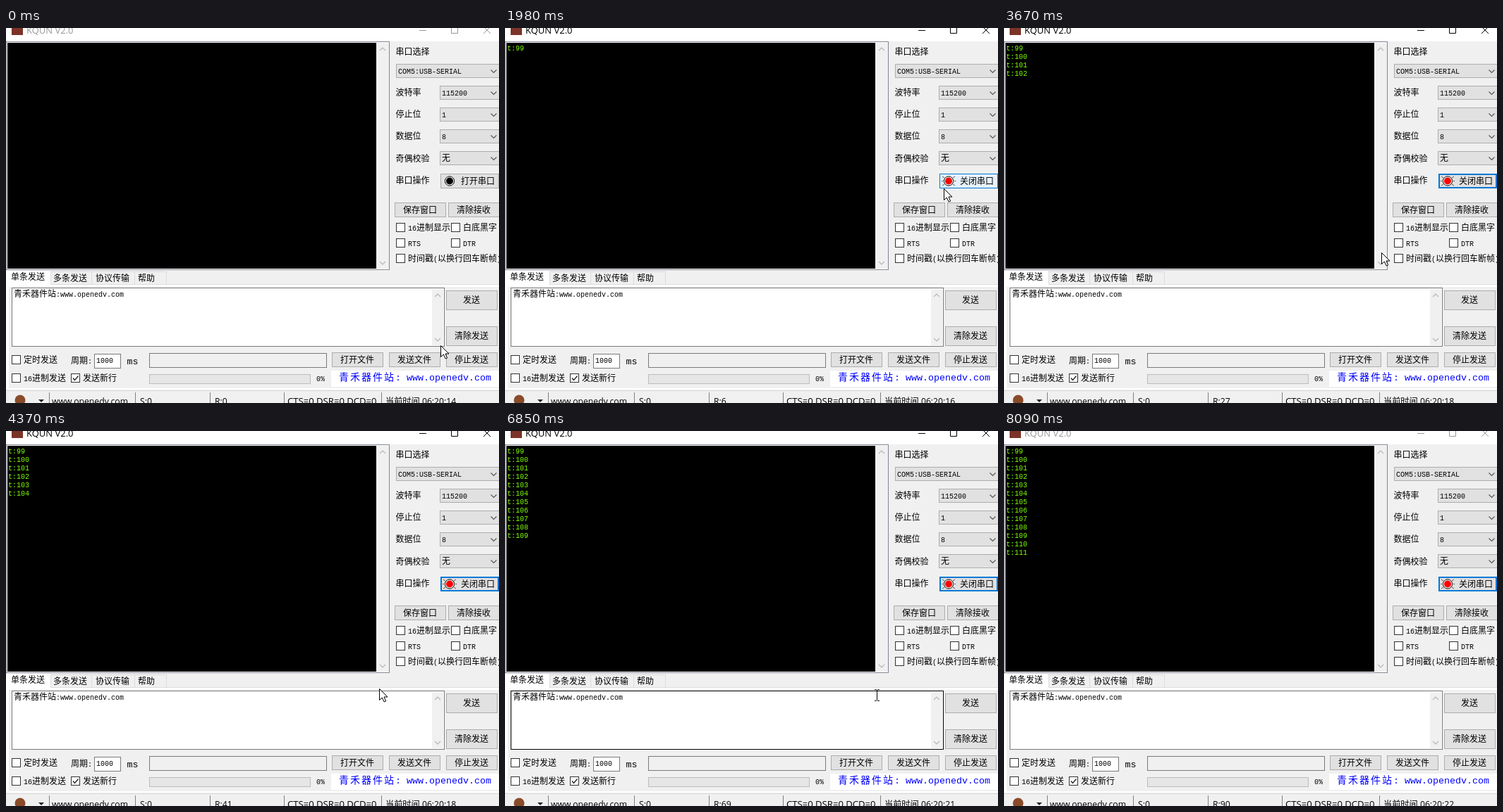
An HTML page for the animation above (8.16 s loop, 699 by 533 pixels).

```html
<!DOCTYPE html>
<html lang="zh">
<head>
<meta charset="utf-8">
<style>
  html, body { margin: 0; width: 100%; height: 100%; overflow: hidden; background: #f0f0f0; }
  svg { display: block; width: 699px; height: 533px; }
  text { white-space: pre; }
  .cjk { font-family: "Noto Sans CJK SC", "Noto Sans CJK", sans-serif; }
  .mono { font-family: "Liberation Mono", monospace; }
  .ui { font-family: "Open Sans", "Noto Sans CJK SC", "Noto Sans CJK", sans-serif; }
</style>
</head>
<body>
<svg id="stage" viewBox="0 0 699 533"></svg>
<script>
const LOOP = 8160;
const STEP = LOOP / 106; // the screen refreshes in even steps
const stage = document.getElementById('stage');
const BLUE = '#0078d7', GRAY = '#adadad', PALE = '#b5b5b5';

function set(el, attrs) {
  for (const key in attrs) el.setAttribute(key, attrs[key]);
}
function add(tag, attrs, parent = stage) {
  const el = document.createElementNS('http://www.w3.org/2000/svg', tag);
  set(el, attrs);
  return parent.appendChild(el);
}
const fillRect = (x, y, width, height, fill) => add('rect', { x, y, width, height, fill });
const box = (x, y, w, h, fill, stroke) =>
  add('rect', { x: x + .5, y: y + .5, width: w - 1, height: h - 1, fill, stroke });
const line = (d, stroke, width = 1) => add('path', { d, stroke, 'stroke-width': width, fill: 'none' });
const circle = (cx, cy, r, fill, stroke = 'none') => add('circle', { cx, cy, r, fill, stroke });
const chevron = (x, y, dir, color) => line(`M${x - 4} ${y - 2 * dir}l4 ${4 * dir} 4 ${-4 * dir}`, color, 1.1);

// Mixed text: full-width characters at the given size, Latin at half that advance.
function label(str, x, y, size = 12, fill = '#000') {
  const el = add('text', { x, y, fill });
  for (const run of str.match(/[\x00-\x7f]+|[^\x00-\x7f]+/g)) {
    const latin = run.charCodeAt(0) < 128;
    add('tspan', { class: latin ? 'mono' : 'cjk', 'font-size': latin ? size / 1.2 : size }, el).textContent = run;
  }
  return el;
}
function uiText(str, x, y, size = 12.2) {
  const el = add('text', { x, y, class: 'ui', 'font-size': size });
  el.textContent = str;
  return el;
}

const buttons = [];
function button(str, x, y, w, h) {
  const b = { x, y, w, h, shape: box(x, y, w, h, '#e1e1e1', GRAY) };
  label(str, x + w / 2 - 6 * str.length - .5, y + h / 2 + 4);
  buttons.push(b);
  return b;
}
function combo(str, x, y) {
  box(x, y, 700 - x, 20, '#e1e1e1', GRAY);
  label(str, x + 3, y + 14);
  chevron(691.5, y + 10.5, 1, '#555');
}
function check(str, x, y, checked) {
  box(x, y, 13, 13, '#fff', '#333');
  if (checked) line(`M${x + 3} ${y + 6.5}l2.5 3 5 -6`, '#222', 1.3);
  label(str, x + 17, y + 10.5);
}
function scrollbar(x, y, w, h) {
  fillRect(x, y, w, h, '#f0f0f0');
  chevron(x + w / 2, y + 9, -1, PALE);
  chevron(x + w / 2, y + h - 8, 1, PALE);
}

// Title bar
fillRect(0, 0, 699, 19, '#fff');
fillRect(8, -6, 16, 16, '#7b3427');
const title = uiText('KQUN V2.0', 29, 8, 13);
const controls = line('M586 3.5h10M631.5 -2v9.500h9v-9.500M677 -2l10 10M687 -2l-10 10', '#000');

// Terminal
box(0, 19, 544, 325, '#fff', '#828790');
fillRect(2, 21, 523, 321, '#000');
scrollbar(525, 21, 18, 321);

// Port settings
label('串口选择', 552.5, 38);
combo('COM5:USB-SERIAL', 553, 51);
['波特率', '停止位', '数据位', '奇偶校验', '串口操作'].forEach((s, i) => label(s, 552.5, 96 + 31.2 * i));
['115200', '1', '8', '无'].forEach((s, i) => combo(s, 615, 82 + 31 * i));
const port = button(' ', 616, 207, 83, 21);
const rays = line('M620 211l3 2M620 224l3 -2M638 211l-3 2M638 224l-3 -2M619 217.500h2M637 217.500h2', '#555');
circle(629, 217.5, 6.6, '#fff', '#000');
const lamp = circle(629, 217.5, 5);
const openText = label('打开串口', 645, 221.5);
const closeText = label('关闭串口', 645, 221.5);
button('保存窗口', 551, 248, 73, 21);
button('清除接收', 627, 248, 73, 21);
check('16进制显示', 553, 277);
check('白底黑字', 631, 277);
check('RTS', 553, 299);
check('DTR', 631, 299);
check('时间戳(以换行回车断帧)', 553, 321);

// Tabs and send panel
fillRect(0, 365, 699, 149, '#fff');
fillRect(4, 368, 695, 144, '#f0f0f0');
fillRect(0, 345, 63, 21, '#fff');
line('M63 346.500H228M63.500 345v20M121.500 347v18M182.500 347v18M227.500 347v18M63 364.500H699', '#dcdcdc');
['单条发送', '多条发送', '协议传输', '帮助'].forEach((s, i) => label(s, 7 + 60 * i, i ? 360 : 358));
const edit = box(8, 369, 614, 84, '#fff', '#7a7a7a');
scrollbar(604, 371, 16, 80);
label('青禾器件站:www.openedv.com', 11, 382);
button('发送', 624, 373, 73, 28);
button('清除发送', 624, 424, 73, 28);
['打开文件', '发送文件', '停止发送'].forEach((s, i) => button(s, 462 + 81 * i, 461, 73, 21));
check('定时发送', 8, 465);
check('16进制发送', 8, 491);
check('发送新行', 92, 491, true);
label('周期:', 92, 476.5);
box(125, 463, 38, 21, '#fff', '#7a7a7a');
label('1000', 128, 476);
label('ms', 171.5, 478, 16);
box(203, 462, 252, 21, '#f0f0f0', '#7a7a7a');
box(203, 492, 229, 14, '#e6e6e6', '#bcbcbc');
label('0%', 440, 502);
fillRect(461, 487, 238, 23, '#fff');
set(label('青禾器件站', 472, 500.5, 14, '#00f'), { 'letter-spacing': 2 });
label(': www.openedv.com', 552, 501, 16, '#00f');

// Status bar
line('M0 515.500H699', '#d9d9d9');
line([61, 183, 289, 394, 532].map(x => `M${x + .5} 518V533`).join(''), '#808080');
circle(20, 529, 7.5, '#8a4b2a');
add('path', { d: 'M46 528h8l-4 4z', fill: '#222' });
uiText('www.openedv.com', 65, 534.5);
uiText('S:0', 190, 534.5);
const received = uiText('', 296, 534.5);
uiText('CTS=0 DSR=0 DCD=0', 399, 534.5, 13.1);
const clock = uiText('', 538, 534.5);

// Steady events: how many have happened by time t
const ticks = (t, first, period) => Math.max(0, Math.floor((t - first) / period) + 1);
const countLines = t => ticks(t, 1840, 497);
const printed = Array.from({ length: 13 }, (_, i) => label('t:' + (99 + i), 3, 32 + 12 * i, 12, '#80ff00'));

// Pointer glides, each eased from the previous place
const glides = [
  { from: 0, to: 460, x: 629, y: 257 },
  { from: 800, to: 920, x: 623, y: 255 },
  { from: 930, to: 1230, x: 622, y: 228 },
  { from: 2100, to: 2840, x: 548, y: 281 },
  { from: 2840, to: 3240, x: 535, y: 315 },
  { from: 3560, to: 4380, x: 529, y: 366 },
  { from: 6120, to: 6400, x: 527, y: 375 },
  { from: 6950, to: 7850, x: 592, y: 540 }
];
function pointerAt(t) {
  let x = 616, y = 451;
  for (const g of glides) {
    const p = Math.min(1, Math.max(0, (t - g.from) / (g.to - g.from)));
    const ease = p * p * (3 - 2 * p);
    x += (g.x - x) * ease;
    y += (g.y - y) * ease;
  }
  return [Math.round(x), Math.round(y)];
}
const arrow = add('path', {
  d: 'M.5 .5V16.500L4.300 13L7.200 19L9.600 18L7 12H12Z', fill: '#fff', stroke: '#000'
});
const beam = add('path', {
  d: 'M-3 -7.500h2.500l1 1 1 -1H4M.5 -7V8M-3 8.500h2.500l1 -1 1 1H4', fill: 'none', stroke: '#000'
});
const editArea = { x: 8, y: 369, w: 596, h: 83 };
const show = (el, on) => set(el, { visibility: on ? 'visible' : 'hidden' });
const inside = (x, y, r) => x >= r.x && x <= r.x + r.w && y >= r.y && y <= r.y + r.h;

function paintButton(b, hover, pressed, focus) {
  const inset = focus ? 1 : .5;
  set(b.shape, {
    x: b.x + inset, y: b.y + inset, width: b.w - 2 * inset, height: b.h - 2 * inset,
    fill: pressed ? '#cce4f7' : hover ? '#e5f1fb' : '#e1e1e1',
    stroke: pressed ? '#005499' : hover || focus ? BLUE : GRAY,
    'stroke-width': 2 * inset
  });
}

function render(t) {
  const [x, y] = pointerAt(t);
  const inEdit = inside(x, y, editArea);
  const connected = t >= 1450;
  const pressed = t >= 1300 && !connected;
  const ink = t >= 1300 && t < 8010 ? '#000' : '#999';

  set(title, { fill: ink });
  set(controls, { stroke: ink });

  for (const b of buttons) {
    const hover = inside(x, y, b);
    paintButton(b, hover, b === port && pressed, b === port && connected && !hover);
  }
  set(lamp, { fill: connected ? '#f00' : '#000' });
  show(rays, connected);
  show(openText, !connected);
  show(closeText, connected);

  printed.forEach((el, i) => show(el, i < countLines(t)));
  // The byte counter trails the printed lines slightly.
  received.textContent = 'R:' + Math.max(0, 7 * countLines(t - 60) - 1);
  clock.textContent = '当前时间 06:20:' + (14 + ticks(t, 600, 990));

  set(edit, { stroke: inEdit ? '#000' : '#7a7a7a' });
  show(arrow, !inEdit);
  show(beam, inEdit);
  set(inEdit ? beam : arrow, { transform: `translate(${x} ${y})` });
}

function frame() {
  const t = performance.now() % LOOP;
  render(Math.min(105, Math.round(t / STEP)) * STEP);
  requestAnimationFrame(frame);
}
frame();
</script>
</body>
</html>
```
